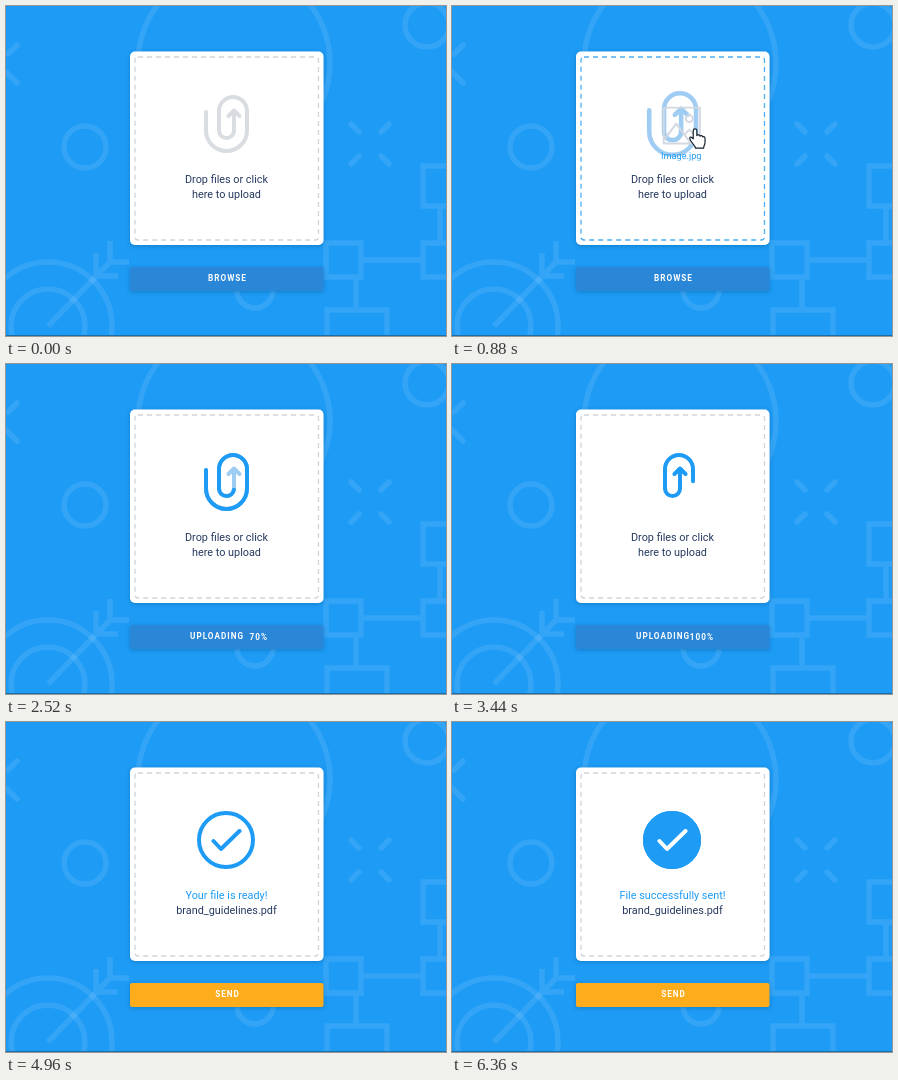
Recreate the animation shown at these times as an HTML page. Size 440 by 330 pixels, loop 7000 ms.

```html
<!DOCTYPE html>
<html lang="en">
<head>
<meta charset="utf-8">
<title>File upload</title>
<style>
@property --n { syntax: "<integer>"; inherits: false; initial-value: 0; }
:root { --blue: #1d9bf5; --pale: #9fccf3; --grey: #d9dce1; --ink: #263a60; }
html, body { margin: 0; width: 100%; height: 100%; overflow: hidden; background: var(--blue); }
svg { position: absolute; left: 0; top: 0; width: 440px; height: 330px; }
text, .pct { font-family: Roboto, sans-serif; }
.line { fill: none; stroke-linecap: round; stroke-linejoin: round; stroke-width: 4; }
.label { font-size: 10.85px; text-anchor: middle; fill: var(--ink); }
.label.hi { fill: var(--blue); }
.cap, .pct { font-size: 8.2px; font-weight: 700; letter-spacing: 1px; fill: #fff; color: #fff; }
.mid { text-anchor: middle; }
.trim { stroke-dasharray: 1 2; }

/* every part runs on the same 7 s loop */
.a { animation: 7s linear infinite; }

.drag { animation-name: drag; animation-timing-function: cubic-bezier(.333, 1, .667, 1); }
@keyframes drag {
  0%, 2.286% { transform: translate(473px, 140px); }
  17.14%, 100% { transform: translate(222px, 119px); }
}
.drop { animation-name: drop; }
@keyframes drop {
  0%, 17.71% { transform: scale(1); opacity: 1; }
  21.71%, 100% { transform: scale(.65); opacity: 0; }
}
.dash { animation-name: dash; }
@keyframes dash {
  0%, 8.57% { stroke: #d0d4d9; }
  12%, 18.57% { stroke: #4eaff3; }
  22.29%, 100% { stroke: #d0d4d9; }
}
.clip { transform-origin: 220px 118px; animation-name: clip; animation-timing-function: ease-in-out; }
@keyframes clip {
  0%, 8.57% { transform: scale(1); stroke: var(--grey); }
  12%, 18.57% { transform: scale(1.14); stroke: var(--pale); }
  23.43%, 100% { transform: scale(1); stroke: var(--pale); }
}
.base { animation-name: base; }
@keyframes base {
  0%, 44.7% { opacity: 1; }
  46%, 100% { opacity: 0; }
}
.fill { animation-name: fill, during; }
@keyframes fill {
  0%, 21.43% { stroke-dashoffset: 1; }
  36%, 39% { stroke-dashoffset: .1; }
  44.7%, 46.14% { stroke-dashoffset: 0; }
  53.14%, 100% { stroke-dashoffset: -1; }
}
@keyframes during {
  0%, 21.43% { opacity: 0; }
  21.44%, 53.1% { opacity: 1; }
  53.14%, 100% { opacity: 0; }
}
.tip { animation-name: tip; }
@keyframes tip {
  0%, 41% { opacity: 0; }
  44.7%, 51% { opacity: 1; }
  53.14%, 100% { opacity: 0; }
}

.browse { animation-name: browse; }
@keyframes browse { 0%, 16.57% { opacity: 1; } 20.29%, 100% { opacity: 0; } }
.load { animation-name: load; }
@keyframes load {
  0%, 16.57% { opacity: 0; }
  20.29%, 53.71% { opacity: 1; }
  59.43%, 100% { opacity: 0; }
}
.pct { position: absolute; right: auto; left: 162px; width: 100px; top: 267.6px; line-height: 10px; text-align: right; }
.pct span { animation-name: count; animation-timing-function: cubic-bezier(.37, 0, .63, 1); }
.pct span::after { content: counter(n) "%"; }
.pct span { counter-reset: n var(--n); }
@keyframes count { 0%, 21.43% { --n: 0; } 44.71%, 100% { --n: 100; } }

.out { animation-name: out; }
@keyframes out { 0%, 53.71% { opacity: 1; } 59.43%, 100% { opacity: 0; } }
.in { animation-name: in; }
@keyframes in { 0%, 53.71% { opacity: 0; } 59.43%, 100% { opacity: 1; } }
.ready { animation-name: ready; }
@keyframes ready {
  0%, 53.71% { opacity: 0; }
  59.43%, 79.4% { opacity: 1; }
  85.1%, 100% { opacity: 0; }
}
.sent { animation-name: sent; }
@keyframes sent { 0%, 79.4% { opacity: 0; } 85.1%, 100% { opacity: 1; } }
.press { animation-name: press; animation-timing-function: ease-in-out; }
@keyframes press {
  0%, 74.29% { filter: brightness(1); }
  79% { filter: brightness(.92); }
  90%, 100% { filter: brightness(1); }
}

.spin, .ring, .rise { animation-timing-function: cubic-bezier(.333, 1, .667, 1); }
.spin { transform-origin: 220px 118px; animation-name: spin, show; }
@keyframes spin { 0%, 53.43% { transform: rotate(160deg); } 70.86%, 100% { transform: rotate(0deg); } }
@keyframes show { 0%, 53.43% { visibility: hidden; } 53.44%, 100% { visibility: visible; } }
.ring { animation-name: draw; }
.rise { animation-name: rise; }
.tick { animation-name: draw; animation-timing-function: cubic-bezier(.3, .3, .5, 1); }
@keyframes draw { 0%, 53.43% { stroke-dashoffset: 1; } 70.86%, 100% { stroke-dashoffset: 0; } }
@keyframes rise { 0%, 53.43% { transform: translateY(14px); } 70.86%, 100% { transform: none; } }
.flood { animation-name: flood; animation-timing-function: ease-in-out; }
@keyframes flood {
  0%, 72.57% { r: 27px; stroke-width: 4px; opacity: 0; }
  72.58% { r: 27px; stroke-width: 4px; opacity: 1; }
  78.57%, 100% { r: 14.5px; stroke-width: 29px; opacity: 1; }
}
.white { animation-name: white; animation-timing-function: ease-out; }
@keyframes white {
  0%, 77.14% { stroke-dashoffset: 1; opacity: 0; }
  77.15% { stroke-dashoffset: 1; opacity: 1; }
  85.71%, 100% { stroke-dashoffset: 0; opacity: 1; }
}
</style>
</head>
<body>
<svg viewBox="0 0 440 330">
  <defs>
    <filter id="soft" x="-10%" y="-10%" width="120%" height="130%">
      <feDropShadow dx="0" dy="1" stdDeviation="2" flood-color="#06406f" flood-opacity=".35"/>
    </filter>
    <path id="hook" pathLength="1" d="M200 106V124.5A20.5 20.5 0 0 0 241 124.5V105A14 14 0 0 0 213 105V124.5A7.5 7.5 0 0 0 228 124.5V105"/>
    <path id="head" d="M222.5 110L228 104.5L233.5 110"/>
    <path id="check" pathLength="1" d="M207.5 119L215 127L233.5 109"/>
  </defs>

  <rect width="440" height="330" fill="#1d9bf5"/>
  <g fill="none" stroke="#fff" stroke-opacity=".1" stroke-width="5.5">
    <circle cx="228" cy="57" r="96"/>
    <circle cx="421" cy="19" r="22"/>
    <circle cx="79" cy="141" r="21"/>
    <circle cx="249" cy="284" r="18"/>
    <circle cx="42" cy="320" r="64"/>
    <circle cx="42" cy="320" r="37"/>
    <path d="M42 320L104 256M90 247V270H112M104 235V256H123"/>
    <path stroke-linecap="round" d="M345 118L353 126M375 126L383 118M345 158L353 150M375 150L383 158M2 48L11 39M0 66L11 77"/>
    <path d="M320 237H355V271H320ZM417 237H450V271H417ZM417 160H450V200H417ZM355 254H417M434 200V237M350 271V304M321 304H381V340H321Z"/>
  </g>
  <rect y="329" width="440" height="1" fill="#176fae"/>

  <rect x="124" y="45.5" width="193.5" height="193.5" rx="5" fill="#fff" filter="url(#soft)"/>
  <rect class="a dash" x="129" y="51" width="183.5" height="183" rx="3" fill="none" stroke-width="1.3" stroke-dasharray="5 4"/>

  <g class="a clip line">
    <g class="a base"><use href="#hook"/><use href="#head"/></g>
    <g stroke="#1d9bf5">
      <use href="#hook" class="a fill trim"/>
      <use href="#head" class="a tip"/>
    </g>
  </g>

  <g class="a spin line" stroke="#1d9bf5">
    <path class="a ring trim" pathLength="1" d="M220 91A27 27 0 0 0 220 145A27 27 0 0 0 220 91"/>
    <g class="a rise"><use href="#check" class="a tick trim"/></g>
  </g>
  <circle class="a flood" cx="220" cy="118" r="27" fill="none" stroke="#1d9bf5"/>
  <use href="#check" class="a white trim line" stroke="#fff"/>

  <g class="a out">
    <text class="label" x="220.5" y="177">Drop files or click</text>
    <text class="label" x="220.5" y="192">here to upload</text>
  </g>
  <text class="a ready label hi" x="220.5" y="177">Your file is ready!</text>
  <text class="a sent label hi" x="220.5" y="177">File successfully sent!</text>
  <text class="a in label" x="220.5" y="192">brand_guidelines.pdf</text>

  <g class="a press">
    <rect x="124" y="261" width="193.5" height="24" rx="2" fill="#2b86d7" filter="url(#soft)"/>
    <rect class="a in" x="124" y="261" width="193.5" height="24" rx="2" fill="#fdac1c"/>
    <text class="a browse cap mid" x="221.5" y="275.4">BROWSE</text>
    <text class="a load cap" x="184" y="275.4">UPLOADING</text>
    <text class="a in cap mid" x="221.5" y="275.4">SEND</text>
  </g>

  <g class="a drag"><g class="a drop">
    <g fill="none" stroke="#d3d8e0" stroke-width="2" stroke-linejoin="round">
      <rect x="-17.5" y="-18" width="36" height="36"/>
      <circle cx="8" cy="-7" r="3.5"/>
      <path d="M-17 14L-5 -2L9 17M3 9L8 4L18 14"/>
    </g>
    <text class="label hi" y="33" style="font-size:9.2px">Image.jpg</text>
    <path transform="translate(14 3)" fill="#fff" stroke="#16202e" stroke-width="1.2" stroke-linejoin="round" d="M-2 2a1.8 1.8 0 0 1 3.6 0v5c.5-1.2 3-1 3.2.6.6-1 2.6-.8 2.8.8.8-.8 2.2-.3 2.2 1.4v4.2c0 2-1.4 3-1.4 5.5H.2c0-2-2-3-4.2-6.6-1.2-2-2.2-3.4-1.2-4.2 1-.7 2.2.2 3.2 1.6z"/>
  </g></g>
</svg>
<div class="a load pct"><span class="a"></span></div>
</body>
</html>
```
